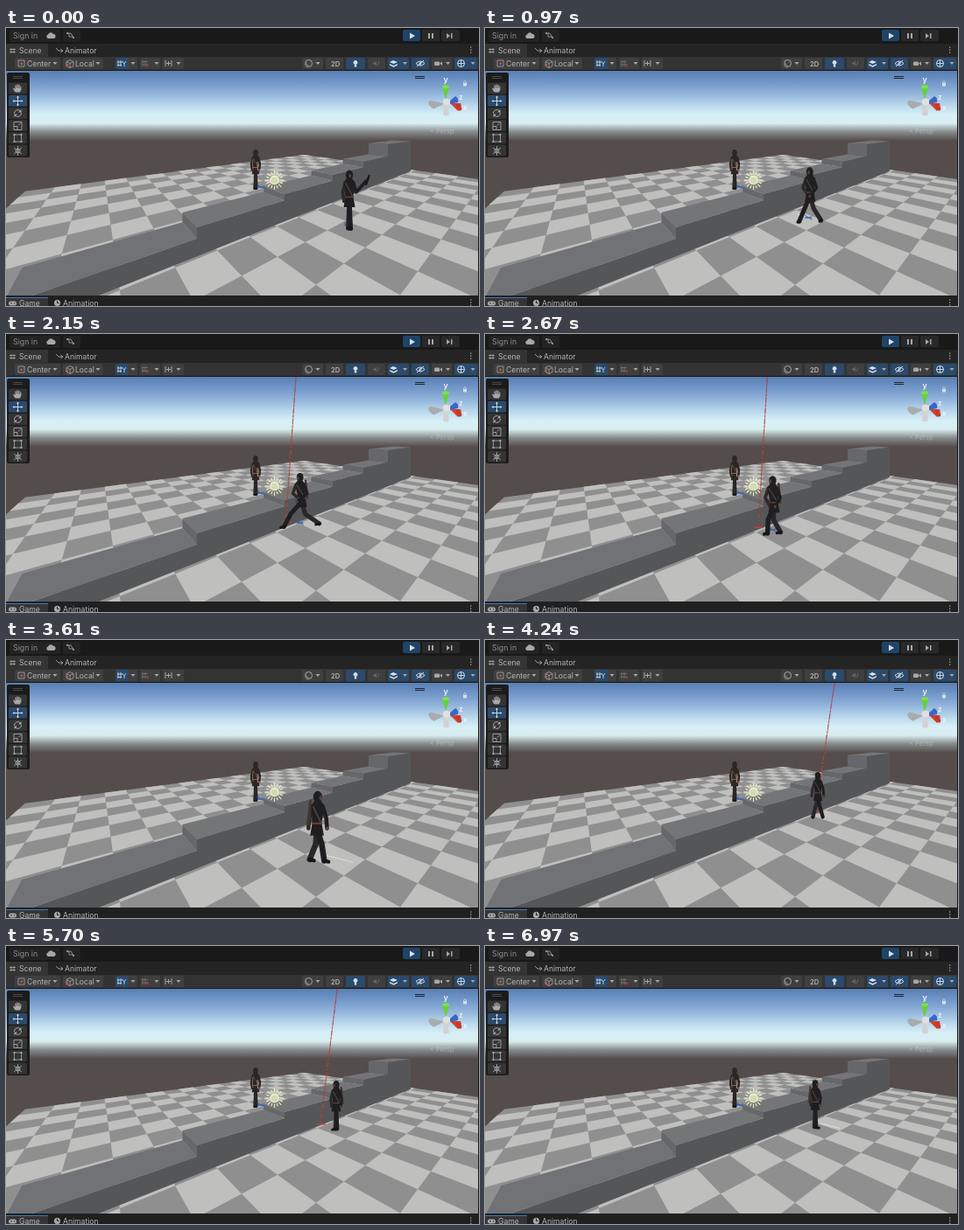
An HTML page with a canvas for the animation above (7 s loop, 540x318 px).

```html
<!DOCTYPE html>
<html lang="en">
<head>
<meta charset="utf-8">
<title>Scene view</title>
<style>
html, body { margin: 0; width: 540px; height: 318px; overflow: hidden; background: #191919; }
canvas, svg { position: absolute; left: 0; top: 0; width: 540px; height: 318px; display: block; }
text { font-family: Inter, Roboto, "Liberation Sans", sans-serif; fill: #b4b4b4; }
</style>
</head>
<body>
<canvas id="view" width="540" height="318"></canvas>
<svg id="ui" viewBox="0 0 540 318"></svg>
<script>
const LOOP = 7000;
const ctx = document.getElementById('view').getContext('2d');
const backdrop = document.createElement('canvas');
backdrop.width = 540;
backdrop.height = 318;

// ---------- editor interface ----------
const ICON = '#a8a8a8', LIT = '#d6e0ea', BLUE = '#2b4a6c', BTN = '#3f3f3f';
const rect = (x, y, w, h, fill, r = 0) =>
  `<rect x="${x}" y="${y}" width="${w}" height="${h}" rx="${r}" fill="${fill}"/>`;
const text = (x, y, s, size = 8.6, extra = '') =>
  `<text x="${x}" y="${y}" font-size="${size}" ${extra}>${s}</text>`;
const line = (d, color = ICON, w = 1) =>
  `<path d="${d}" fill="none" stroke="${color}" stroke-width="${w}"/>`;
const shape = (d, fill = ICON) => `<path d="${d}" fill="${fill}"/>`;
const ring = (x, y, r, color = ICON, fill = 'none') =>
  `<circle cx="${x}" cy="${y}" r="${r}" fill="${fill}" stroke="${color}"/>`;
const caret = x => shape(`M${x - 2.5} 39h5l-2.5 3z`);
const menu = (x, y) => [-3, 0, 3].map(d => rect(x, y + d - .6, 1.3, 1.3, ICON)).join('');

// Buttons side by side; a # in lit marks an active one
function buttonRow(x, widths, lit) {
  return widths.map((w, i) => {
    const s = rect(x, 34, w, 13, lit[i] === '#' ? BLUE : BTN, 1.5);
    x += w + 3;
    return s;
  }).join('');
}

function topBars() {
  let s = rect(0, 0, 540, 18, '#191919') + rect(0, 18, 540, 15, '#242424') +
    rect(0, 18, 48, 15, '#343434') + rect(0, 33, 540, 16, '#333') + rect(0, 48, 540, 1, '#1c1c1c');
  s += rect(4, 2, 58, 14, '#232323', 2) + rect(65, 2, 20, 14, '#232323', 2);
  s += text(8, 12, 'Sign in', 8.8, 'style="fill:#8e8e8e"');
  s += shape('M48 12a2.4 2.4 0 0 1 0-4.6a3.3 3.3 0 0 1 6-.6a2.7 2.7 0 0 1 1 5.2z');
  s += line('M70 6h4l3 5M72 6v4h5', ICON, .8) + ring(70, 6, .7) + ring(77, 11, .7);
  s += rect(453, 2, 20, 13, '#204467', 2) + rect(475, 2, 20, 13, '#292929') + rect(497, 2, 21, 13, '#292929', 2);
  s += shape('M461 5.5v7l6-3.5z', LIT) + rect(482, 6, 2, 6, ICON) + rect(486, 6, 2, 6, ICON);
  s += shape('M503 6v6l4-3z') + rect(508, 6, 1.5, 6, ICON);
  s += line('M6 23v6M9 23v6M4 24.5h7M4 27.5h7', ICON, .8) + text(15, 29, 'Scene');
  s += line('M57 23l3 3h5M62.500 24l2.500 2l-2.500 2', ICON, .9) + text(67, 29, 'Animator');
  return s + menu(530, 25);
}

function toolbar() {
  let s = buttonRow(10, [52, 46], '') + buttonRow(125, [25, 23, 24], '#') +
    buttonRow(338, [24, 20, 22, 20, 24, 20, 23, 26], '..#.##.#') + rect(140, 34, 10, 13, BTN);
  s += line('M14 37h7v7h-7z', ICON, .8) + rect(16.5, 39.5, 2.5, 2.5, '#b95a49') + text(24, 44, 'Center') + caret(56);
  s += line('M69 38.5l4-2l4 2v5l-4 2l-4-2zM69 38.5l4 2l4-2M73 40.5v5', ICON, .8) +
    rect(68.5, 41, 2.5, 2.5, '#b95a49') + text(79, 44, 'Local') + caret(105);
  s += line('M128 37v7M131 37v7M127 39h6M127 42.500h5M133 38l2 3l2-3M135 41v3', LIT, .8) + caret(145);
  s += line('M156 37v7M159 37v7M155 38.500h7M155 42h6', '#777', .8) + rect(160, 41, 3, 3, '#7d4740') + caret(172);
  s += line('M182 37v7M189 37v7M183 40.500h5M185.500 38v5') + caret(197);
  s += ring(345.5, 40.5, 4) + shape('M343 38a4 4 0 1 0 5.500 5.500a5 5 0 0 1-5.500-5.500z', '#777') + caret(356);
  s += text(371, 43.8, '2D', 7.6, 'font-weight="600"');
  s += ring(399, 39.500, 2, LIT, LIT) + rect(397.8, 42, 2.4, 2.500, LIT);
  s += shape('M419 39.500h2l2-2v6l-2-2h-2z', '#666') + line('M426 38l-2 5', '#666');
  s += shape('M438 41l4.500 2l4.500-2v1.500l-4.500 2.200l-4.500-2.200zM438 39l4-2l5 2l-4.500 2z', LIT) + caret(455.5);
  s += line('M468 40.500q5-5 10 0q-5 5-10 0zM469 44l8-7', LIT) + ring(473, 40.500, 1, LIT);
  s += rect(489, 38.500, 6, 4.500, ICON, 1) + shape('M495 40.500l3-2v4.500z') + caret(504.5);
  return s + ring(519.5, 40.500, 4, LIT) + line('M515.500 40.500h8M519.500 36.500v8', LIT, .9) + caret(533);
}

function tools() {
  let s = rect(1, 51, 26, 97, '#1b1b1b', 2) + line('M8 55.500h11M8 57.500h11', '#555', .8);
  for (let i = 0; i < 6; i++) s += rect(3, 62.500 + i * 14.2, 21, 13, i === 1 ? BLUE : '#343434', 1.5);
  s += shape('M10 73l-2-4l1-.6l1.500 1.500v-4.500h1.300v3h.6v-4h1.300v4h.6v-3.300h1.300v4h.6v-2.500h1.200v4l-1.500 3h-4z');
  s += line('M13.500 78.500v10M8.500 83.500h10', LIT, .9);
  for (let a = 0; a < 360; a += 90) s += `<path d="M11.900 79.500h3.200l-1.600-2z" fill="${LIT}" transform="rotate(${a} 13.500 83.500)"/>`;
  s += line('M9.500 98a4 4 0 0 1 7-3M17.500 97a4 4 0 0 1-7 3') + shape('M17.500 93v3.500h-3.500zM9.500 102v-3.500h3.500z');
  s += line('M9 107.500h9v9h-9zM9 112.500h4v4M14 111.500l3-3', ICON, .9) + line('M9.500 122h8v8h-8z', ICON, .8);
  for (let i = 0; i < 4; i++) s += rect(8.5 + i % 2 * 8, 121 + (i >> 1) * 8, 2, 2, ICON);
  return s + ring(13.500, 140.500, 2.500) + line('M9 137l9 7M9 144l9-7M13.500 135v11', ICON, .8);
}

function axes() {
  let s = line('M467 55.500h11M467 57.500h11', '#20262c');
  s += shape('M482 85l2.500-2.500l16 4l-12 6q-5-2-6.500-7.500z', '#a9abad') + shape('M500 87h4l2 12q-4 3-7 0z', '#d2d2d0');
  s += shape('M506 84l7-6q4 2 3 7l-9 2z', '#3568c8') + shape('M507 86l12 0q2 5-3 9z', '#d2412f') +
    '<ellipse cx="517" cy="90.500" rx="2.400" ry="4.500" transform="rotate(-32 517 90.500)" fill="#c23a2b"/>';
  s += shape('M498 67q4-3.500 8 0l-3.500 13h-1z', '#63d238') + '<ellipse cx="502" cy="67.300" rx="4" ry="2" fill="#7be050"/>';
  s += shape('M499 82l4-1.500l4 1.500v5l-4 2l-4-2z', '#e0e0dc');
  const white = 'font-weight="600" style="fill:#f2f5f7"';
  s += text(499.500, 62, 'y', 9, white) + text(517, 82, 'z', 8, white) + text(522, 94, 'x', 8, white);
  s += rect(522, 63, 4, 3.500, LIT) + line('M522.700 63v-1.500q1.200-2 2.500 0v1.500', LIT, .8);
  return s + text(484, 121, '&lt; Persp', 7.500, 'style="fill:#fff;fill-opacity:.33"');
}

function bottomBar() {
  let s = rect(0, 306, 540, 12, '#202020') + rect(0, 308, 48, 10, '#353535') + rect(0, 308, 48, 1, '#3a79bb');
  s += rect(3, 312.500, 9, 5, ICON, 2.5) + rect(5, 314.300, 2, 1, '#333') + rect(9, 314.300, 1.200, 1.200, '#333');
  s += text(15, 317.5, 'Game') + ring(58.500, 314.500, 3.200, ICON, ICON) + line('M58.500 312v2.500h2', '#202020');
  return s + text(65, 317.5, 'Animation') + menu(530, 314) + rect(539, 49, 1, 257, '#181818');
}
document.getElementById('ui').innerHTML = topBars() + toolbar() + tools() + axes() + bottomBar();

// ---------- perspective ----------
// Vanishing points: along the stairs, across them, and straight down
const HORIZON = 112, ALONG = 592, ACROSS = 104, DOWN = { x: 270, y: 925 };
const slopeY = (x, slope) => HORIZON + slope * (ALONG - x);
const WALL = .399;

// Floor point, counted in tiles from the far corner
function floorPoint(u, v) {
  const a = u * .0279, b = v * .0389, w = 1 - a - b;
  return w < .025 ? null : [(340 - ALONG * a - ACROSS * b) / w, (145 - HORIZON * (a + b)) / w];
}

// The far end of a tread edge that starts at its near corner
function acrossStairs(x, slope) {
  const y = slopeY(x, slope), k = (y - HORIZON) / (x - ACROSS), left = slope * .818;
  const bx = (ALONG * left + ACROSS * k) / (k + left);
  return [bx, slopeY(bx, left)];
}

// ---------- drawing helpers ----------
function poly(c, pts, fill) {
  c.beginPath();
  pts.forEach(p => c.lineTo(...p));
  c.closePath();
  c.fillStyle = fill;
  c.fill();
}
function stroke(c, pts, color, w) {
  c.beginPath();
  pts.forEach(p => c.lineTo(...p));
  c.strokeStyle = color;
  c.lineWidth = w;
  c.stroke();
}
function dot(c, x, y, rx, ry, fill) {
  c.beginPath();
  c.ellipse(x, y, rx, ry, 0, 0, 7);
  c.fillStyle = fill;
  c.fill();
}

// ---------- world ----------
function drawSky(c) {
  const sky = c.createLinearGradient(0, 49, 0, 129);
  ['#587eb3', '#6c91c4', '#83a6d3', '#9dbfe0', '#bcd9ed', '#d6eff6', '#d9eef0', '#85898a', '#544d4b']
    .forEach((col, i, all) => sky.addColorStop(i / (all.length - 1), col));
  c.fillStyle = sky;
  c.fillRect(0, 49, 540, 257);
}

function drawFloor(c) {
  poly(c, [floorPoint(0, 0), floorPoint(20, 0), floorPoint(20, 10), floorPoint(0, 24)], '#8f8f8f');
  for (let u = 0; u < 20; u++) for (let v = u % 2; v < 25; v += 2) {
    const q = [floorPoint(u, v), floorPoint(u + 1, v), floorPoint(u + 1, v + 1), floorPoint(u, v + 1)];
    if (q.every(Boolean)) poly(c, q, '#bfbfbe');
  }
}

function drawStairs(c) {
  const edges = [-5, 218, 318, 373, 408, 436, 462];
  const slopes = [.345, .31, .285, .256, .223, .135];
  slopes.forEach((m, i) => {
    const x = edges[i], end = edges[i + 1];
    const near = [x, slopeY(x, m)], far = acrossStairs(x, m);
    const below = slopes[i - 1] || WALL;
    poly(c, [near, [end, slopeY(end, m)], [end, slopeY(end, WALL)], [x, slopeY(x, WALL)]], '#555658');
    poly(c, [far, acrossStairs(end, m), [end, slopeY(end, m)], near], i ? '#747577' : '#717275');
    if (i) poly(c, [far, near, [x, slopeY(x, below)], [far[0], slopeY(far[0], below * .818)]], '#66676a');
  });
}

function drawSun(c) {
  c.save();
  c.translate(306.5, 174);
  for (let i = 0; i < 16; i++) {
    c.rotate(Math.PI / 8);
    stroke(c, [[6.5, 0], [10 + i % 2, 0]], '#ece9bd', 1.2);
  }
  dot(c, 0, 0, 5.3, 5.3, '#f2f3d8');
  dot(c, 0, .5, 4, 4, '#cfdcb0');
  c.restore();
}

function drawBackdrop(c) {
  drawSky(c);
  drawFloor(c);
  drawStairs(c);
}

// ---------- figures ----------
// Drawn one unit tall, with the feet at the origin
function figure(c, x, y, h, { face = 0, run = 0, phase = 0, raise = 0, main = '#1f1e20', trim = '#6a3d33', skin = '#5b4339' }) {
  const s = Math.sin(phase) * run, lean = face * run * .03;
  c.save();
  c.translate(x, y);
  c.scale(h, h);
  c.lineCap = c.lineJoin = 'round';
  const leg = (k, color) => {
    const trailing = Math.max(0, -k * face);
    const foot = [k * .34, -.03 - trailing * .06];
    stroke(c, [[0, -.48], [k * .14 + face * run * .07, -.26], foot], color, .08);
    stroke(c, [foot, [foot[0] + face * .06, foot[1] + .015]], '#161517', .05);
  };
  const arm = (side, hand) =>
    stroke(c, [[lean + side * .07, -.79], [lean + side * (.11 + run * .02), -.63], hand], side < 0 ? '#2d2927' : main, .055);
  const stand = .055 * (1 - run);
  leg(-s - stand, '#29272a');
  leg(s + stand, main);
  arm(-1, [lean - .09 - s * .15, -.48]);
  stroke(c, [[lean - face * .1, -.86], [lean - face * .13, -.55]], '#403733', .04);
  poly(c, [[lean - .04, -.87], [lean + .04, -.87], [lean + .09, -.8], [.065, -.56], [.095, -.38], [-.095, -.38], [-.065, -.56], [lean - .09, -.8]], main);
  stroke(c, [[lean - .06, -.78], [.05, -.57]], '#47423f', .022);
  stroke(c, [[-.06, -.55], [.06, -.55]], trim, .022);
  const hand = raise ? [.3, -.48 - raise * .36] : [lean + .09 + s * .15, -.48];
  arm(1, hand);
  dot(c, ...hand, .022, .025, skin);
  if (raise) stroke(c, [[hand[0] - .02, hand[1] + .08], [hand[0] + .03, hand[1] - .07]], '#161517', .03);
  dot(c, lean, -.92, .062, .08, main);
  if (Math.abs(face) > .25) dot(c, lean + face * .04, -.905, .02, .032, skin);
  c.restore();
}

function floorMark(c, x, y) {
  for (let i = -1; i < 2; i++) stroke(c, [[x - 4, y + i * 1.8], [x + 4, y + 1.5 - i * 1.8]], '#2f64b4', .9);
}

function companion(c, t) {
  figure(c, 285, 184.5, 45.5, { face: -.2, main: '#2c2626', trim: '#8a6450', skin: '#9b6a51' });
  stroke(c, [[282, 150], [281.5 + Math.sin(t / 557) * .25, 156], [282, 162]], '#80594a', 1.2);
  stroke(c, [[287, 153], [287.5, 163]], '#a08a7a', 1.1);
  floorMark(c, 291, 181);
}

// ---------- motion ----------
const ROUTE = [
  { t: 0, x: 392, y: 231, face: .3, run: 0 },
  { t: 1580, x: 353, y: 219, face: -1, run: 1 },
  { t: 2670, x: 330, y: 230, face: -1, run: .8 },
  { t: 3610, x: 355, y: 255, face: 1, run: .35 },
  { t: 4240, x: 380, y: 204, face: -.15, run: .3 },
  { t: 5700, x: 377, y: 211, face: -1, run: 0 },
  { t: 6970, x: 377, y: 209, face: 1, run: 0 }
];
const clamp = (v, lo, hi) => Math.min(hi, Math.max(lo, v));

// Smooth curve through the route's values for one property
function along(key, t) {
  let i = 0;
  while (i < ROUTE.length - 2 && t > ROUTE[i + 1].t) i++;
  const speed = j => {
    const a = ROUTE[j - 1], b = ROUTE[j + 1];
    return a && b ? (b[key] - a[key]) / (b.t - a.t) : 0;
  };
  const a = ROUTE[i], b = ROUTE[i + 1], span = b.t - a.t, k = clamp((t - a.t) / span, 0, 1);
  const ease = k * k * (3 - 2 * k);
  return a[key] + (b[key] - a[key]) * ease +
    span * k * (1 - k) * ((1 - k) * speed(i) - k * speed(i + 1));
}

// Upright ray where the wall ahead is hit
function wallRay(c, x, y) {
  const top = x + (x - DOWN.x) * (y - 49) / (DOWN.y - y);
  stroke(c, [[top, 49], [x, y]], 'rgba(120,50,45,.5)', .9);
  c.setLineDash([6, 2, 2, 2]);
  stroke(c, [[top, 49], [x, y]], '#cf4039', .9);
  c.setLineDash([]);
  stroke(c, [[x - 4, y], [x + 6, y + .5]], '#d83c33', 1.2);
}

function hero(c, t) {
  const x = along('x', t), y = along('y', t), h = (y - HORIZON) * .575;
  const face = clamp(along('face', t), -1, 1), run = clamp(along('run', t), 0, 1);
  const facesWall = y - slopeY(x, WALL) < 17 && face < .2;
  if (facesWall) wallRay(c, x + face * 18, y - h * .13);
  else if (Math.abs(face) > .35) {
    const from = x + face * h * .1, reach = face * h * .4;
    stroke(c, [[from, y - h * .11], [from + reach, y - h * .11 + reach * .25]], '#e4e6e7', .9);
  }
  if (run > .5 || t < 1580) floorMark(c, x - 2, y - 7);
  figure(c, x, y, h, { face, run, raise: clamp(1 - t / 900, 0, 1), phase: t * Math.PI / 300 + .73 });
}

function draw(t) {
  ctx.drawImage(backdrop, 0, 0);
  companion(ctx, t);
  drawSun(ctx);
  hero(ctx, t);
}

drawBackdrop(backdrop.getContext('2d'));
const start = performance.now();
function tick() {
  draw((performance.now() - start) % LOOP);
  requestAnimationFrame(tick);
}
draw(0);
requestAnimationFrame(tick);
</script>
</body>
</html>
```
